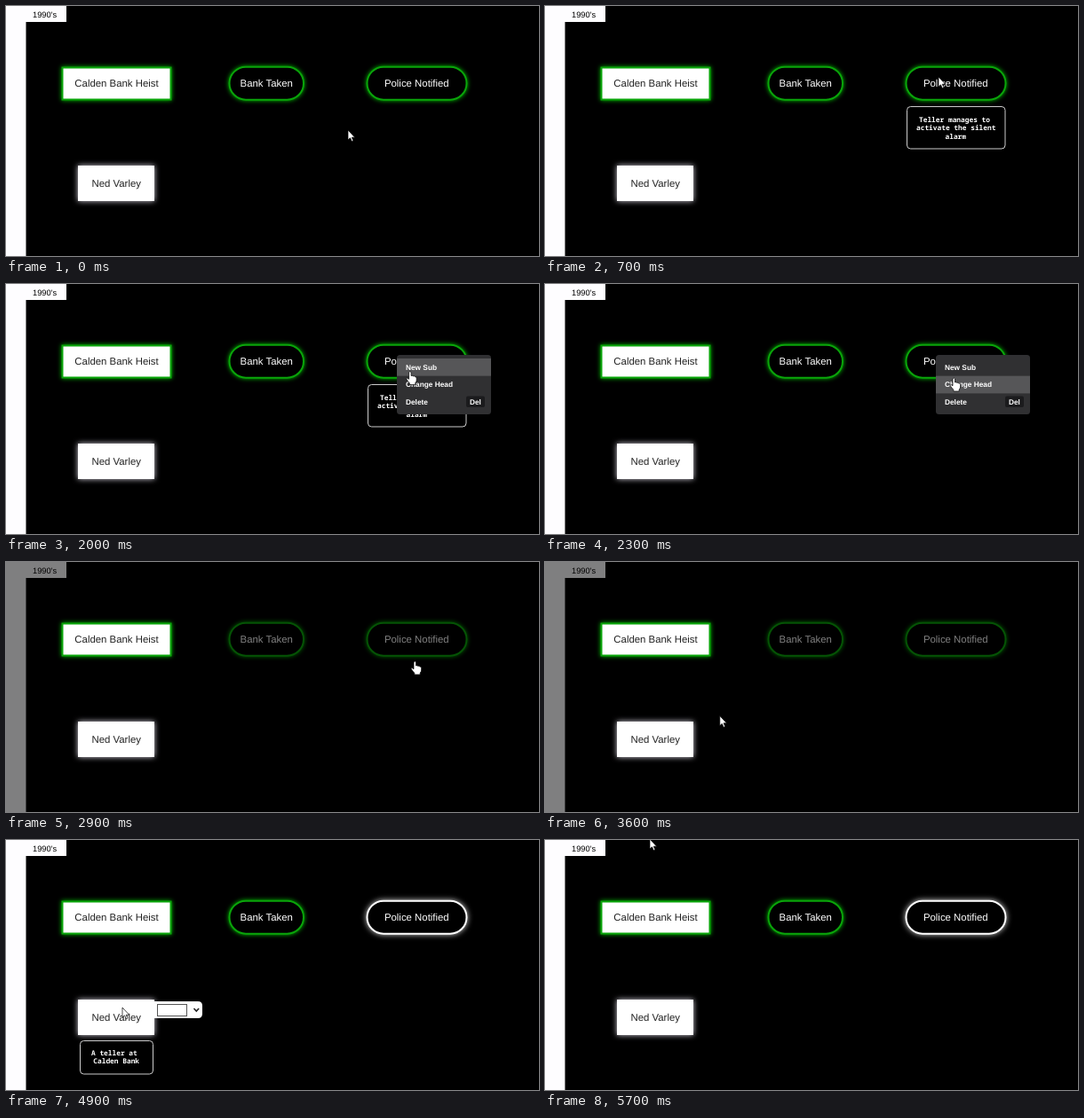
Recreate the animation shown at these times as an HTML page. Size 600 by 282 pixels, loop 5800 ms.

```html
<!DOCTYPE html>
<html lang="en">
<head>
<meta charset="utf-8">
<title>Timeline editor</title>
<style>
  html, body { margin: 0; width: 100%; height: 100%; overflow: hidden; background: #000; }
  svg { display: block; width: 100%; height: 100%; }
  text { font: 11.4px "Liberation Sans", Arial, sans-serif; text-rendering: geometricPrecision; white-space: pre; }
  .card text { text-anchor: middle; fill: #222; }
  .pill text { fill: #fff; }
  .green { stroke: #0aa50a; stroke-width: 2; filter: drop-shadow(0 0 2.5px #0b0); }
  .white { stroke: #fff; stroke-width: 2; filter: drop-shadow(0 0 3px #ccc); }
  .glow { filter: drop-shadow(0 0 3px #d8d4e0); }
  .note rect { fill: #000; stroke: #ccc; }
  .note text { font: 600 7.85px "Noto Sans Mono", "DejaVu Sans Mono", monospace; fill: #fff; }
  #menu text { font-size: 8.3px; font-weight: bold; fill: #fff; }
</style>
</head>
<body>
<svg viewBox="0 0 600 282">
  <rect width="600" height="282"/>
  <g class="dim">
    <path d="M0 0H68V18H22.5V282H0Z" fill="#fefdff"/>
    <text x="30" y="12.5" style="font-size:9.3px">1990's</text>
  </g>
  <g class="card">
    <rect class="green" x="63.5" y="69.5" width="122" height="36" fill="#fff"/>
    <text x="124.5" y="91">Calden Bank Heist</text>
    <rect class="glow" x="81" y="180" width="86" height="40" fill="#fff"/>
    <text x="124.2" y="203.5">Ned Varley</text>
  </g>
  <g class="card pill dim">
    <rect class="green" x="251.5" y="68.7" width="83.5" height="37" rx="18.5"/>
    <text x="293.2" y="91">Bank Taken</text>
    <rect id="police" x="406.5" y="68.7" width="112" height="37" rx="18.5"/>
    <text x="462.3" y="91">Police Notified</text>
  </g>

  <g id="alarm" class="note">
    <rect x="407.5" y="113.5" width="110.5" height="47.5" rx="4"/>
    <text x="421" y="130.5">Teller manages to</text>
    <text x="418" y="140.2">activate the silent</text>
    <text x="450.5" y="150">alarm</text>
  </g>
  <g id="person" class="note">
    <rect x="83.5" y="226.5" width="82" height="37.5" rx="4"/>
    <text x="96" y="242.7">A teller at</text>
    <text x="98.3" y="252.4">Calden Bank</text>
    <path d="M167 182H216Q221 182 221 187V196Q221 201 216 201H167Z" fill="#fff"/>
    <rect x="170.5" y="185.5" width="33" height="13" style="fill:#fff;stroke:#555"/>
    <path d="M211.5 190L214.3 193L217.1 190" fill="none" stroke="#222" stroke-width="1.6"/>
  </g>

  <g id="menu">
    <rect x="440" y="80" width="106" height="67" rx="3.5" fill="#303032"/>
    <rect id="row" x="440" width="106" height="19.7" fill="#565658"/>
    <text x="450" y="96.5">New Sub</text>
    <text x="450" y="116.3">Change Head</text>
    <text x="450" y="135.8">Delete</text>
    <rect x="518" y="126.5" width="21" height="12.5" rx="2" fill="#1b1b1d"/>
    <text x="522" y="135.8">Del</text>
  </g>

  <g id="cursor" fill="#fff" stroke="#000" stroke-width=".7" stroke-linejoin="round">
    <path id="arrow" d="M0 0V11L2.5 8.8L4.3 12.8L6 12L4.3 8.2H7.7Z"/>
    <path id="hand" d="M-1 1Q.3-.8 1.5 1V5Q2.8 4.3 3.8 5.4Q5 4.8 5.8 6Q7.5 5.8 7.6 7.5V10Q7.5 12 6.2 13V15H-.2V13.2Q-2.5 11-4 8.3Q-3.2 6.6-1 8.8Z"/>
  </g>
</svg>
<script>
const LOOP = 5800, STEP = 100, ROW_TOP = 84, ROW_H = 19.7;
const $ = id => document.getElementById(id);
const dimmed = document.querySelectorAll('.dim');

// time, x, y of the pointer tip
const path = [
  [0, 385, 140], [500, 446, 101], [600, 446, 101], [700, 443, 80], [900, 443, 80],
  [1100, 441, 80], [1500, 441, 80], [2200, 460, 106], [2600, 460, 106],
  [2800, 460, 112], [3200, 460, 112], [3700, 131, 189], [4900, 131, 189],
  [5000, 257, 130], [5100, 170, 105], [5200, 170, 105], [5700, 118, -1], [LOOP, 118, -1]
];

const ramp = (t, a, b) => Math.min(1, Math.max(0, (t - a) / (b - a)));
const pulse = (t, a, b, c, d) => ramp(t, a, b) - ramp(t, c, d);
const show = (id, on) => $(id).setAttribute('visibility', on ? 'visible' : 'hidden');

function pointer(t) {
  const i = path.findIndex(p => p[0] > t);
  const [t0, x0, y0] = path[i - 1], [t1, x1, y1] = path[i];
  const k = ramp(t, t0, t1);
  return [x0 + (x1 - x0) * k, y0 + (y1 - y0) * k];
}

function draw(t) {
  const [x, y] = pointer(t);
  const open = t >= 1500 && t < 2700;
  const row = open ? Math.floor((y - ROW_TOP) / ROW_H) : -1;
  const hand = row >= 0 || (t >= 2700 && t <= 3200);

  $('cursor').setAttribute('transform', `translate(${x} ${y})`);
  show('arrow', !hand);
  show('hand', hand);
  show('menu', open);
  show('row', row >= 0);
  $('row').setAttribute('y', ROW_TOP + row * ROW_H);

  $('alarm').style.opacity = pulse(t, 300, 500, 2100, 2300);
  $('person').style.opacity = pulse(t, 3700, 4000, 5200, 5500);
  $('police').setAttribute('class', t < 4400 ? 'green' : 'white');
  for (const el of dimmed) el.style.opacity = 1 - pulse(t, 2600, 2900, 4300, 4600) / 2;
}

function frame() {
  draw(Math.floor(performance.now() % LOOP / STEP) * STEP);
  requestAnimationFrame(frame);
}
frame();
</script>
</body>
</html>
```
